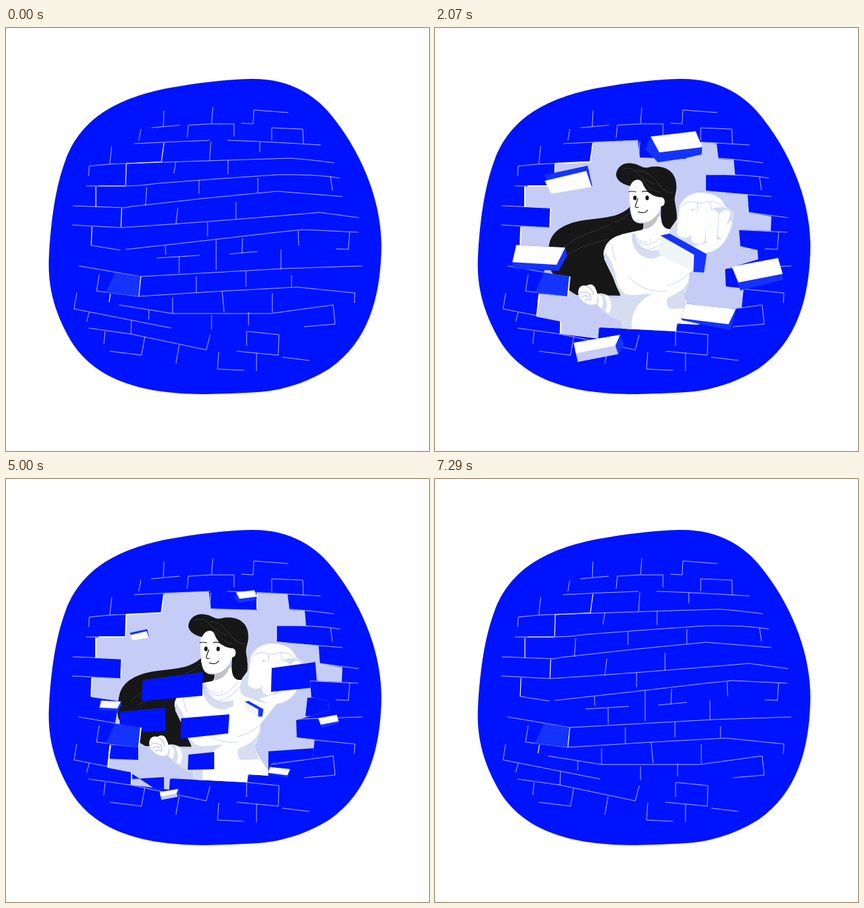
These frames come from a looping animation (640 px wide and 640 px high, 7.43 s). An HTML page with a canvas:

```html
<!DOCTYPE html>
<html lang="en">
<head>
<meta charset="utf-8">
<title>Breaking through the wall</title>
<style>
html, body { margin: 0; width: 100%; height: 100%; overflow: hidden; background: #fff; }
canvas { display: block; }
</style>
</head>
<body>
<canvas id="stage" width="640" height="640"></canvas>
<script>
const ctx = document.getElementById('stage').getContext('2d');
const LOOP = 7430, CLOSED = 6000, SWAY = 2590;
const BLUE = '#0013ff', EDGE = '#1433ff', LILAC = '#c5cdf7', SHADE = '#d6ddf0', INK = '#171717', WHITE = '#fff';

const blob = new Path2D(`M370,77 C430,76 470,102 497,138 C545,200 568,270 568,330 C567,410 547,475 490,515
  C450,540 410,550 372,551.500 C340,553 320,554 295,554 C200,553 133,530 98,473 C70,425 63,385 65,345
  C68,290 75,240 90,200 C115,132 175,105 245,91 C290,83 330,78 370,77Z`);

const hole = new Path2D(`M240,173 L307,170 310,196 380,198 380,172 426,174 429,198 452,199 454,222 410,222 410,246
  473,252 475,279 509,285 508,307 460,305 462,330 488,336 489,350 439,365 440,391 467,394 464,423 401,430 400,449
  366,447 365,459 248,453 247,470 190,463 190,444 154,437 158,402 201,406 204,376 165,370 171,336 129,330 130,300
  174,302 176,273 136,271 136,240 181,238 182,205 236,202Z`);

const rim = new Path2D(`M239,174 L235,203 M182,205 L181,238 M121,239 M136,240 V271 M175,273 L174,301
  M130,301 L129,329 M204,376 L201,406 M158,402 L156,415 M140,239 H180 M182,205 L235,202.500`);

const joints = new Path2D(`M239,125 L238,149 M220,151 L263,147 M313,120 L311,144 M204,153 L201,170
  M274,166 L276,147 Q310,144 345,145 V164 M356,144 L374,145 375,124 427,128 M402,170 V151 L449,153 450,175
  M194,175 Q250,172 308,170 M335,170 Q380,171 476,177 M384,172 V188 M310,172 L308,200 M160,179 L157,206
  M125,224 L126,209 Q160,205 181,205 Q300,201 430,197 Q460,199 496,204 M257,203 L254,220 M336,200 V221
  M121,239 H181 Q205,239 230,235 Q320,228 410,222 Q470,221 505,227 M491,225 L494,246 M381,227 V249 M292,231 V251
  M213,241 L211,269 M101,269 L180,272 190,270 Q300,257 410,247 L509,255 M260,272 L257,297 M348,263 V289
  M100,298 L174,302 Q300,294 475,279 L534,287 M305,293 V315 M129,329 L173,336 M181,335 Q300,322 410,309 L450,305 533,309
  M442,307 L443,329 M520,308 L518,335 499,334 M241,329 L242,343 M318,320 V366 M358,318 L357,341 M338,342 L381,338
  M228,348 L293,344 M262,346 V371 M416,335 V365 M110,360 L204,376 Q350,368 420,364 L539,360 M288,376 V401
  M363,368 V391 M432,374 V391 M141,373 L137,398 201,406 Q320,398 440,392 L528,401 527,416 M252,408 V432
  M327,398 L330,430 M403,401 V430 M107,401 L103,425 250,454 M171,419 L252,432 H400 L495,419 498,448 451,452
  M126,430 L122,444 M216,427 V441 M311,435 V456 M367,430 V450 M190,442 L189,463 M125,454 L189,463 303,487 309,464
  M150,459 L148,478 M157,489 L205,495 210,467 M262,480 L257,508 M365,459 L413,464 412,495 349,489 M364,459 V481
  M322,490 L320,516 360,518 M379,492 V519 M418,498 L459,503`);

// Each row: top joint height at x = 300, its slope, then [left, right] of every brick.
const rows = [
  [165, 0, [120, 312], [312, 412], [412, 480]],
  [223, -.115, [110, 204], [204, 378], [378, 490]],
  [250.5, -.13, [120, 254], [254, 347], [347, 418], [418, 500]],
  [289.5, -.083, [110, 171], [171, 284], [303, 376], [382, 461], [461, 498], [501, 520]],
  [324, -.094, [120, 318], [318, 360], [362, 450], [450, 500]],
  [347.5, -.06, [150, 260], [260, 318], [318, 419], [419, 471], [471, 510]],
  [379, -.03, [140, 286], [286, 435], [435, 490]],
  [411, -.04, [140, 251], [251, 329], [329, 393], [393, 480]],
  [446, 0, [140, 247], [247, 420]],
  [480, 0]
];

// Bricks that arrive first, by row and index, with the corners they have on arrival.
const firstComers = {
  '3,1': [207, 304, 298, 292, 297, 328, 205, 336],
  '3,3': [402, 286, 468, 277, 471, 315, 401, 322],
  '5,0': [172, 352, 241, 346, 242, 381, 172, 384],
  '5,1': [265, 362, 338, 356, 336, 385, 264, 393],
  '7,1': [276, 417, 315, 413, 315, 439, 275, 440],
  '7,3': [397, 412, 470, 407, 470, 450, 397, 450],
  '5,4': [456, 331, 500, 328, 500, 356, 453, 359],
  '7,0': [150, 402, 200, 404, 200, 425, 150, 423],
  '8,0': [185, 442, 190, 454, 239, 451, 239, 478]
};

const bricks = [];
rows.slice(0, -1).forEach(([y, slope, ...cells], r) => {
  const top = x => y + slope * (x - 300) + .8;
  const bottom = x => rows[r + 1][0] + rows[r + 1][1] * (x - 300) - .8;
  cells.forEach(([l, right], i) => {
    const a = l + .9, b = right - .9;
    const place = [a, top(a), b, top(b), b, bottom(b), a, bottom(a)];
    const arrival = firstComers[r + ',' + i];
    bricks.push({ place, from: arrival || place, start: arrival ? 4750 : 5030 + (r * 5 + i * 3) % 7 * 45, span: arrival ? 250 : 400 });
  });
});

// dx, dy: float amplitude; faces are painted in order.
const floaters = [
  { c: [362, 178], dx: -1.2, dy: 2.3, faces: [
    ['M327,163 L319,182 338,202 378,196 404,190 405,178Z', EDGE], ['M327,163 L395,155 405,179 340,187Z', WHITE]] },
  { c: [202, 235], dx: 0, dy: -7, faces: [
    ['M166,226 L231,212 238,243 176,255Z', EDGE], ['M166,235 L229,220 237,244 176,255Z', WHITE]] },
  { c: [158, 344], dx: 0, dy: 6, faces: [
    ['M123,325 L197,329 200,341 187,364 119,361 117,351Z', EDGE], ['M123,325 L197,329 184,355 117,351Z', WHITE]] },
  { c: [248, 479], dx: 0, dy: 10, faces: [
    ['M210,471 L280,459 275,475 278,488 216,500Z', LILAC], ['M210,471 L280,459 274,475 213,487Z', WHITE],
    ['M280,459 L286,473 277,488 273,475Z', EDGE]] },
  { c: [413, 442], dx: 0, dy: -9, faces: [
    ['M379,422 L455,430 454,438 447,462 374,447 372,444Z', EDGE], ['M379,422 L455,430 444,453 372,444Z', WHITE]] },
  { c: [488, 368], dx: 0, dy: 7.7, faces: [
    ['M449,357 L519,344 526,368 526,377 462,393Z', EDGE], ['M449,357 L519,344 526,368 459,381Z', WHITE]] },
  { c: [375, 346], dx: 0, dy: -9.5, faces: [
    ['M341,319 L355,316 411,347 407,375 391,374Z', EDGE], ['M341,319 L392,348 391,374 339,347Z', '#eff5f9']] }
];
floaters.forEach(f => f.faces = f.faces.map(([d, color]) => [new Path2D(d), color]));

const clamp = (x, a = 0, b = 1) => Math.min(b, Math.max(a, x));
const ease = u => .5 - .5 * Math.cos(Math.PI * clamp(u));
const swing = (t, peak) => Math.cos(2 * Math.PI * (t - peak) / SWAY);

const cache = {};
const path = d => cache[d] || (cache[d] = new Path2D(d));
function fill(d, color) {
  ctx.fillStyle = color;
  ctx.fill(path(d));
}
function line(d, color = LILAC, width = 1) {
  ctx.strokeStyle = color;
  ctx.lineWidth = width;
  ctx.stroke(path(d));
}
function sheared(k, pivot, draw) {
  ctx.save();
  ctx.transform(1, 0, -k, 1, k * pivot, 0);
  draw();
  ctx.restore();
}

function drawTorso() {
  fill(`M316,290 L315,305 C290,311 264,312 257,333 C252,343 257,350 262,358 C270,374 272,390 281,403 L286,425 283,445 285,465
    H397 L396,440 C388,428 381,420 376,404 C384,390 386,380 384,372 L412,337 C385,338 366,331 356,305 L340,285Z`, WHITE);
  fill('M384,372 C386,388 374,399 352,408 C349,415 351,422 356,425 L383,424 C378,414 376,406 378,398 C386,387 386,380 384,372Z', SHADE);
  fill('M256,338 C264,346 272,362 274,378 C276,390 281,396 287,402 C303,407 317,401 329,402 C308,412 295,430 298,458 L283,458 285,420 C278,390 265,370 256,350Z', SHADE);
  fill('M298,311 C296,336 312,349 330,349 L344,344 344,334 C322,342 306,331 302,311Z', SHADE);
  fill('M315,289 L339,281 C337,292 330,302 316,305Z', '#c2c2c6');
  line('M303,310 C304,330 328,338 352,306 M300,312 C301,340 330,346 356,312 M305,318 Q313,325 321,324 M326,324 V319 M268,331 Q270,345 274,352 M292,375 Q315,401 350,398 M350,390 Q368,386 382,374');
}

function drawLeftArm() {
  fill('M244,402 Q255,400 262,405 C270,412 280,407 287,407 C292,422 290,438 282,443 C267,440 254,430 244,418Z', SHADE);
  fill('M249,403 Q259,413 251,424 L246,419 Q250,410 245,403Z M261,405 Q271,418 263,432 L258,429 Q263,417 256,405Z', WHITE);
  fill('M217,397 C218,391 223,388 229,390 C235,386 241,388 243,395 C247,401 246,411 244,417 C238,421 232,418 229,417 C221,412 215,405 217,397Z', WHITE);
  line('M219,402 Q226,397 232,402 M222,407 Q228,403 233,407 M226,412 Q231,409 234,411 M230,391 Q239,395 240,404 M233,401 Q238,407 234,413', '#c3cbea', 1.5);
}

function drawFace() {
  fill('M296,230 C293,250 294,270 297,284 C301,298 314,297 323,293 C333,288 340,279 342,269 L344,238 315,222Z', WHITE);
  line('M295,266 C295,292 307,298 322,293');
  ctx.fillStyle = INK;
  for (const x of [302.5, 321]) {
    ctx.beginPath();
    ctx.ellipse(x, 257, 2.6, 3.6, 0, 0, 7);
    ctx.fill();
  }
  line('M293,248 Q298,246 304,248 M313,248 Q320,245 327,250 M307,258 L303,269 Q303,273 308,271 M307,278 Q318,282 322,275', INK, 1.2);
}

function drawFrontHair() {
  fill(`M295,239 C281,236 272,228 274,219 C277,207 288,203 298,205 C309,206 313,213 322,211 C343,206 364,214 365,238
    C366,248 361,255 363,264 C366,278 370,302 357,304 C343,305 341,292 342,270 L340,256 C326,254 318,246 313,233
    C308,227 301,229 297,235Z`, INK);
  line('M283,214 Q296,208 306,220 Q320,232 332,236 M305,216 C335,215 335,248 361,250 M313,229 Q325,246 341,249', '#444', .7);
}

function drawFist() {
  fill('M357,302 C351,320 355,330 370,331 C390,344 425,343 439,321 L452,296 430,270 380,270Z', SHADE);
  fill('M371,270 C379,251 398,247 411,250 C427,251 437,262 439,270 L452,278 448,298 C445,318 430,340 408,340 C396,340 386,336 384,332 L437,318 428,285Z', WHITE);
  fill('M368,275 C375,262 390,260 400,264 C415,259 430,264 438,272 C448,272 455,279 452,288 L437,302 H368Z', SHADE);
  fill(`M369,280 C373,270 386,270 389,278 L387,314 C382,320 369,317 366,311Z
    M386,280 C392,272 407,272 411,280 L408,322 C404,329 392,328 388,322Z
    M409,279 C417,272 427,275 429,282 L426,323 C421,329 412,328 410,321Z
    M430,282 C437,272 447,274 447,282 L438,305 440,313 C438,321 430,319 428,313Z`, WHITE);
  fill('M370,269 C380,249 400,247 412,250 C428,252 437,264 439,272 C428,269 420,274 410,277 C395,272 382,272 370,281Z', WHITE);
  line('M371,270 Q383,259 396,264 Q404,267 411,263 Q425,260 437,271 M397,264 L398,277 M415,264 L419,274');
}

function drawScene(t) {
  const sway = swing(t, 80);
  ctx.fillStyle = LILAC;
  ctx.fillRect(0, 0, 640, 640);
  sheared(.045 * sway, 285, () => {
    fill(`M299,265 C286,285 262,286 240,289 C205,292 178,302 173,327 C171,340 169,350 173,362 C182,380 195,393 215,404
      L285,405 290,330 310,312 322,290Z`, INK);
    line('M190,336 C215,312 245,308 265,297 M272,294 Q286,289 295,279 M202,342 Q230,325 262,320', '#444', .7);
  });
  drawTorso();
  drawLeftArm();
  drawFace();
  sheared(.053 * sway, 275, drawFrontHair);
  fill('M338,257 C346,253 350,262 346,268 C343,271 339,270 338,267Z', WHITE);
  drawFist();
}

function drawBrick({ place, from, start, span }, time) {
  const grow = ease((time - start) / span);
  if (grow <= 0) return;
  const settle = ease((time - 5000) / 650);
  const pts = place.map((v, i) => from[i] + (v - from[i]) * settle);
  const cx = (pts[0] + pts[2] + pts[4] + pts[6]) / 4, cy = (pts[1] + pts[3] + pts[5] + pts[7]) / 4;
  const scale = grow + .15 * ease((time - 5710) / 280);
  ctx.beginPath();
  for (let i = 0; i < 8; i += 2) ctx.lineTo(cx + (pts[i] - cx) * scale, cy + (pts[i + 1] - cy) * scale);
  ctx.fillStyle = BLUE;
  ctx.fill();
}

function drawJoints() {
  ctx.strokeStyle = 'rgba(255,255,255,.68)';
  ctx.lineWidth = 1;
  ctx.stroke(joints);
}

function render(t) {
  // The opening replays the closing backwards, at double speed.
  const time = t < 700 ? CLOSED - Math.max(0, t - 20) * 1300 / 680 : t;
  ctx.fillStyle = WHITE;
  ctx.fillRect(0, 0, 640, 640);
  ctx.fillStyle = BLUE;
  ctx.fill(blob);
  drawJoints();

  if (time < CLOSED) {
    ctx.save();
    ctx.clip(hole);
    drawScene(t);
    bricks.forEach(b => drawBrick(b, time));
    ctx.globalAlpha = clamp((time - 5400) / 500);
    drawJoints();
    ctx.restore();
  }

  fill('M165,370 L204,376 201,406 151,400Z', EDGE);
  ctx.strokeStyle = WHITE;
  ctx.lineWidth = time < 5300 ? 2 : 1.2;
  ctx.stroke(rim);
  if (time < 5500) line('M158,402 L154,436 M190,444 V462 M380,173 V197', WHITE, 2);

  const size = 1 - ease((time - 4720) / 500);
  if (size <= 0) return;
  const bob = swing(t, 1770) - .21;
  for (const { c: [cx, cy], dx, dy, faces } of floaters) {
    ctx.save();
    ctx.translate(cx + dx * bob, cy + dy * bob);
    ctx.scale(size, size);
    ctx.translate(-cx, -cy);
    for (const [shape, color] of faces) {
      ctx.fillStyle = color;
      ctx.fill(shape);
    }
    ctx.restore();
  }
}

function tick() {
  render(performance.now() % LOOP);
  requestAnimationFrame(tick);
}
tick();
</script>
</body>
</html>
```
